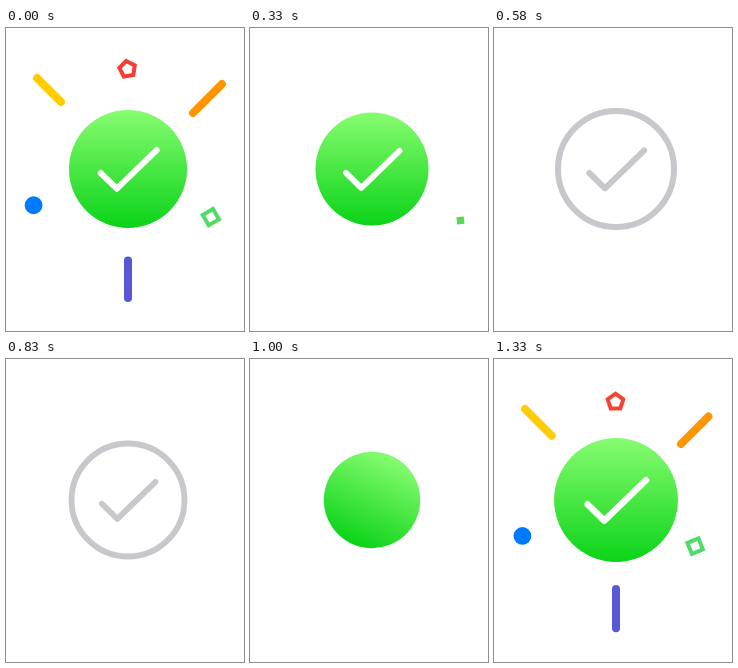
An HTML page with a canvas for the animation above (1370 ms loop, 238 px wide and 303 px high).

```html
<!DOCTYPE html>
<html lang="en">
<head>
<meta charset="utf-8">
<title>Check burst</title>
<style>
  html, body { margin: 0; width: 100%; height: 100%; overflow: hidden; background: #fff; }
  canvas { display: block; }
</style>
</head>
<body>
<canvas id="stage" width="238" height="303"></canvas>
<script>
const ctx = document.getElementById('stage').getContext('2d');
const LOOP = 1370, RESET = 580, CX = 122, CY = 141;
const RADIUS = 58, REACH = 102.5, GREY = '#c7c7cc';
const CHECK = [[-26.7, 4], [-11, 19.3], [28.2, -18.6]];
const CHECK_LENGTH = 76.4;

// Times run from one reset (580) to the next (1950).
// Hues drift by so many degrees per ms and are given for the time LOOP.
const lines = [
  { hue: 48, sat: 100, light: 50, from: [60, 79], to: [31, 50], start: 1080, leave: 1250 },
  { hue: 35, sat: 100, light: 50, from: [187, 85], to: [216, 56], start: 1155, leave: 1370 },
  { hue: 241, sat: 61, light: 59, drift: .045, from: [122, 229], to: [122, 270], start: 1130, leave: 1285 }
];
const shapes = [
  { hue: 3, sat: 90, light: 58, drift: -.065, sides: 5, radius: 8.2,
    angle: -90.3, turn: -99, spin: -.225, start: 1078, gone: 1620 },
  { hue: 129, sat: 65, light: 59, drift: -.03, sides: 4, radius: 8.4,
    angle: 30.2, turn: -75, spin: -.2, start: 1152, gone: 1755 },
  { hue: 211, sat: 100, light: 50, radius: 8.9, angle: 159, start: 1026, gone: 1620 }
];

const rad = degrees => degrees * Math.PI / 180;
const ramp = (t, start, end) => Math.min(1, Math.max(0, (t - start) / (end - start)));
const easeIn = (...span) => ramp(...span) ** 2;
const easeOut = (...span) => 1 - (1 - ramp(...span)) ** 2;
const smooth = (...span) => { const x = ramp(...span); return x * x * (3 - 2 * x); };
const tint = ({ hue, sat, light, drift = 0 }, t) =>
  `hsl(${hue + drift * (t - LOOP)}, ${sat}%, ${light}%)`;

function stroke(points, color, width, closed) {
  ctx.beginPath();
  points.forEach(p => ctx.lineTo(...p));
  if (closed) ctx.closePath();
  ctx.lineCap = 'round';
  ctx.lineJoin = closed ? 'miter' : 'round';
  ctx.strokeStyle = color;
  ctx.lineWidth = width;
  ctx.stroke();
}

function circle(r) {
  ctx.beginPath();
  ctx.arc(0, 0, r, 0, 2 * Math.PI);
}

function drawLine(line, t) {
  const tail = easeIn(t, line.leave, line.leave + 290);
  const head = easeOut(t, line.start, line.start + 230);
  if (head <= tail) return;
  const point = k => line.from.map((v, i) => v + (line.to[i] - v) * k);
  stroke([point(tail), point(head)], tint(line, t), 8);
}

function drawShape(shape, t) {
  if (t <= shape.start || t >= shape.gone) return;
  const { sides, angle, turn = 0, spin = 0 } = shape;
  const r = shape.radius * (1 - easeIn(t, 1400, shape.gone));
  const distance = REACH * (1 - Math.exp((shape.start - t) / 80));
  ctx.save();
  ctx.translate(CX + distance * Math.cos(rad(angle)), CY + distance * Math.sin(rad(angle)));
  ctx.rotate(rad(turn + spin * (t - LOOP)));
  if (sides) {
    const corners = Array.from({ length: sides }, (_, i) => {
      const a = 2 * Math.PI * i / sides;
      return [r * Math.cos(a), r * Math.sin(a)];
    });
    stroke(corners, tint(shape, t), 4, true);
  } else {
    circle(r);
    ctx.fillStyle = tint(shape, t);
    ctx.fill();
  }
  ctx.restore();
}

function drawRing(t) {
  const s = 1 - .25 * easeIn(t, 750, 1000);
  ctx.save();
  ctx.translate(CX, CY);
  ctx.scale(s, s);
  circle(RADIUS);
  ctx.strokeStyle = GREY;
  ctx.lineWidth = 6;
  ctx.stroke();
  stroke(CHECK, GREY, 6);
  ctx.restore();
}

// The disc pops up, overshoots, sinks a little too far and recovers.
function drawDisc(t) {
  const grown = 1 - (1 - ramp(t, 885, 1175)) ** 2.45;
  const r = 67.5 * grown - 11 * smooth(t, 1220, 1440) + 1.5 * smooth(t, 1690, 1830);
  if (r <= 0) return;
  ctx.save();
  ctx.translate(CX, CY);
  ctx.scale(r / RADIUS, r / RADIUS);

  ctx.save();
  ctx.rotate(rad(85 * (1 - grown)));
  const fill = ctx.createLinearGradient(0, -RADIUS, 0, RADIUS);
  fill.addColorStop(0, '#87fc70');
  fill.addColorStop(1, '#0bd318');
  circle(RADIUS);
  ctx.fillStyle = fill;
  ctx.fill();
  ctx.restore();

  const drawn = ramp(t, 1091, 1200);
  if (drawn > 0) {
    ctx.setLineDash([CHECK_LENGTH * drawn, 200]);
    stroke(CHECK, '#fff', 6);
  }
  ctx.restore();
}

function draw(time) {
  const t = (time % LOOP) + (time % LOOP < RESET ? LOOP : 0);
  ctx.fillStyle = '#fff';
  ctx.fillRect(0, 0, 238, 303);
  if (t < 1000) drawRing(t);
  lines.forEach(line => drawLine(line, t));
  shapes.forEach(shape => drawShape(shape, t));
  drawDisc(t);
}

const begin = performance.now();
function tick() {
  draw(performance.now() - begin);
  requestAnimationFrame(tick);
}
tick();
</script>
</body>
</html>
```
